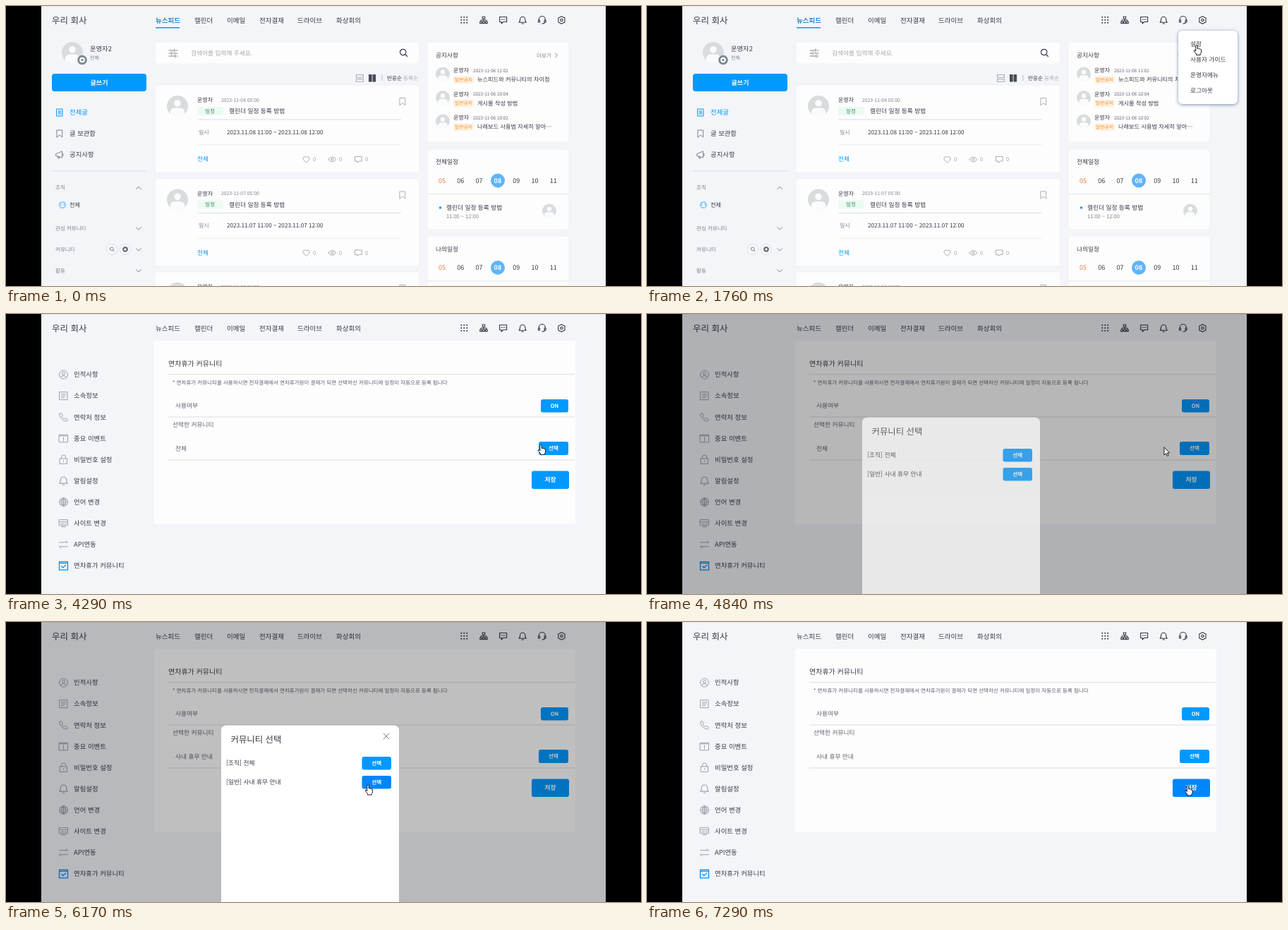
An HTML page for the animation above (7.37 s loop, 900x397 px).

```html
<!DOCTYPE html>
<html lang="ko">
<head>
<meta charset="utf-8">
<title>연차휴가 커뮤니티 설정</title>
<style>
html, body { margin: 0; width: 100%; height: 100%; overflow: hidden; background: #000; }
svg { display: block; width: 900px; height: 397px; }
text { font-family: "Noto Sans CJK KR", "Noto Sans CJK", "Noto Sans", sans-serif; text-rendering: geometricPrecision; white-space: pre; }
#menu { filter: drop-shadow(0 1px 2.5px rgba(60, 85, 130, .65)); }
</style>
</head>
<body>
<svg id="stage" viewBox="0 0 900 397"></svg>
<script>
const INK = '#363b47', GREY = '#7d828d', PALE = '#a9aeb8', LINE = '#e0e3ea',
      BLUE = '#0099ff', HOVER = '#0086fb', BG = '#f4f5f9', WHITE = '#fdfdfe';
const LOOP = 7370;

// Drawing helpers: text is placed by its vertical centre.
const text = (x, y, s, size = 8.7, fill = INK, weight = 400, anchor = 'start') =>
  `<text x="${x}" y="${y + size * .36}" font-size="${size}" fill="${fill}" font-weight="${weight}" text-anchor="${anchor}">${s}</text>`;
const rect = (x, y, w, h, fill, r = 0, extra = '') =>
  `<rect x="${x}" y="${y}" width="${w}" height="${h}" rx="${r}" fill="${fill}" ${extra}/>`;
const circle = (x, y, r, fill, extra = '') => `<circle cx="${x}" cy="${y}" r="${r}" fill="${fill}" ${extra}/>`;
const rule = (x1, x2, y, color = LINE) => rect(x1, y - .6, x2 - x1, 1.2, color);
const card = (x, y, w, h) => rect(x, y, w, h, WHITE, 4, 'stroke="#eceef3" stroke-width=".7"');
const group = (id, body) => `<g id="${id}">${body}</g>`;
const button = (id, x, y, w, h, label, size = 7.6) =>
  rect(x, y, w, h, BLUE, 3, `id="${id}"`) + text(x + w / 2, y + h / 2, label, size, '#fff', 700, 'middle');

const shapes = {
  org: 'M-1.7-5h3.4v3h-3.4zM0-2V1M-4 2V0H4V2M-5.2 2h2.6v2.6h-2.6zM-1.3 2h2.6v2.6h-2.6zM2.6 2h2.6v2.6h-2.6z',
  chat: 'M-5-4.5H5V2.5H0L-2.5 5V2.5H-5zM-2.6-1h.8M-.4-1h.8M1.8-1h.8',
  bell: 'M-5 3.2Q-3.6 2-3.6-1A3.6 3.8 0 0 1 3.6-1Q3.6 2 5 3.2ZM-1.2 5H1.2',
  headset: 'M-4.5 0V-1A4.5 4.5 0 0 1 4.5-1V0M-5.3 0h2v3h-2zM3.3 0h2v3h-2zM4 3Q3.5 5 0 5',
  gear: 'M0-5.3L2-4.2 4.6-3V3L2 4.2 0 5.3-2 4.2-4.6 3V-3L-2-4.2ZM-1.7 0a1.7 1.7 0 1 0 3.4 0a1.7 1.7 0 1 0-3.4 0',
  search: 'M-4.5-1a4.2 4.2 0 1 0 8.4 0a4.2 4.2 0 1 0-8.4 0M2.7 2L5.5 5',
  filter: 'M-6-4H1M4-4H6M2-6V-2M-6 0H-3M0 0H6M-2-2V2M-6 4H2M5 4H6M3 2V6',
  bookmark: 'M-3.7-5H3.7V5L0 2-3.7 5Z',
  heart: 'M0 4.5L-4.2 .4A2.8 2.8 0 0 1 0-3.2A2.8 2.8 0 0 1 4.2 .4Z',
  eye: 'M-5.5 0Q0-7 5.5 0Q0 7-5.5 0ZM-1.6 0a1.6 1.6 0 1 0 3.2 0a1.6 1.6 0 1 0-3.2 0',
  bubble: 'M-4.7-4H4.7V2.5H1L-1.5 4.7V2.5H-4.7Z',
  down: 'M-3.5-1.7L0 1.7 3.5-1.7', up: 'M-3.5 1.7L0-1.7 3.5 1.7', right: 'M-1.5-3L1.5 0-1.5 3',
  page: 'M-4-5H4V5H-4ZM-2-2H2M-2 0H2M-2 2H2',
  horn: 'M-5-1.5L3.5-5V4L-5 1.5ZM-3 2L-2 5H0L-.8 3M5-1.5V1.5',
  person: 'M-6 0a6 6 0 1 0 12 0a6 6 0 1 0-12 0M-2-1.5a2 2 0 1 0 4 0a2 2 0 1 0-4 0M-4 4Q-3.5 1.5 0 1.5T4 4',
  list: 'M-5.5-5.5H5.5V5.5H-5.5ZM-3-2.5H3M-3 0H3M-3 2.5H1',
  phone: 'M-5.5-4.5L-3.5-6-1-2.5-2.5-1Q-1 1.5 1.2 2.6L2.6 1 6 3.5 4.5 5.7Q1 6.5-3 2.3T-5.5-4.5Z',
  event: 'M-6-5H6V5.5H-6ZM-6-3.5H6M0-1.5V2M0 3.2V4',
  lock: 'M-5-1.5H5V6H-5ZM-3-1.5V-3.5A3 3 0 0 1 3-3.5V-1.5M0 1.5V3',
  globe: 'M-6 0a6 6 0 1 0 12 0a6 6 0 1 0-12 0M-6 0H6M0-6V6M-5-3H5M-5 3H5M0-6Q-6 0 0 6Q6 0 0-6',
  site: 'M-6-5H6V3H-6ZM-6-2H6M-3.5 .7H0M2 .7H4M-3 5H3',
  swap: 'M-6-3H6L3.5-5.2M6 3H-6L-3.5 5.2',
  check: 'M-6-5.5H6V6H-6ZM-6-3.5H6M-3 .5L-.7 2.8 3.2-1',
  close: 'M-4-4L4 4M4-4L-4 4'
};
const icon = (name, x, y, color = INK, scale = 1, width = 1) =>
  `<path d="${shapes[name]}" transform="translate(${x} ${y}) scale(${scale})" fill="none" stroke="${color}" stroke-width="${width}" stroke-linejoin="round" stroke-linecap="round"/>`;

const avatar = (x, y, r) => `<g transform="translate(${x} ${y}) scale(${r})">${circle(0, 0, 1, '#d9dcdf')}
  ${circle(0, -.28, .32, '#fafbfc')}<path fill="#fafbfc" d="M-.68 .73V.62Q-.66 .17-.25 .17H.25Q.66 .17 .68 .62V.73A1 1 0 0 1-.68 .73Z"/></g>`;
const cog = (x, y, r, color, hole = '#fff') => circle(x, y, r * .62, 'none', `stroke="${color}" stroke-width="${r * .5}"`) +
  circle(x, y, r * .87, 'none', `stroke="${color}" stroke-width="${r * .28}" stroke-dasharray="${r * .36} ${r * .3233}"`) + circle(x, y, r * .38, hole);

function header() {
  const nav = [[212, '뉴스피드'], [267, '캘린더'], [313, '이메일'], [359, '전자결재'], [413, '드라이브'], [468, '화상회의']];
  let dots = '';
  for (let i = 0; i < 9; i++) dots += circle(645.3 + i % 3 * 4, 15.7 + (i / 3 | 0) * 4, 1.05, INK);
  return text(65, 20, '우리 회사', 12.5) + nav.map(([x, s]) => text(x, 20.5, s, 9.5, INK, 500)).join('') + dots +
    ['org', 'chat', 'bell', 'headset', 'gear'].map((n, i) => icon(n, 677 + i * 27.6, 20, INK, 1, 1.15)).join('');
}

function post(y, day) {
  const stats = [['heart', 425.5, 435], ['eye', 462.5, 472], ['bubble', 499.5, 509]];
  return card(211, y, 375, 124.5) + avatar(243, y + 30, 15) +
    text(271, y + 21.5, '운영자', 8) + text(305, y + 21.5, `2023-11-${day} 05:00`, 6.8, GREY) +
    rect(271, y + 31, 37, 12, '#ecfbf2', 2) + text(289, y + 37, '일정', 7.6, '#3d8d62', 400, 'middle') +
    text(316, y + 37, '캘린더 일정 등록 방법', 8.7, INK, 500) + icon('bookmark', 562, y + 23.5, PALE) +
    rule(271, 560, y + 49) + text(273, y + 67, '일시', 8, GREY) +
    text(313, y + 67, `2023.11.${day} 11:00 ~ 2023.11.${day} 12:00`, 8.2, INK, 500) + rule(271, 560, y + 84.5, '#eceef3') +
    text(271, y + 105, '전체', 8.7, BLUE) +
    stats.map(([n, x, tx]) => icon(n, x, y + 105.5, '#a6abb6') + text(tx, y + 105.5, '0', 7.6, '#a0a5b0', 500)).join('');
}

function week(y, title) {
  const days = ['05', '06', '07', '08', '09', '10', '11'];
  return text(609, y + 18, title, 8.7, INK, 500) + circle(697, y + 44.5, 10, '#5fb4fb') +
    days.map((d, i) => text(618 + i * 26.3, y + 44.5, d, 9, i == 3 ? '#fff' : i ? INK : '#df7c4d', i == 3 ? 700 : 400, 'middle')).join('') +
    rule(597, 798, y + 63.5, '#e4e7ed');
}

function feed() {
  const folds = [[315, '관심 커뮤니티'], [345, '커뮤니티'], [375, '활동']];
  const notices = [['11:02', '뉴스피드와 커뮤니티의 차이점'], ['10:04', '게시물 작성 방법'], ['10:02', '나래보드 사용법 자세히 알아⋯']];
  const left = avatar(94, 66, 15) + circle(108, 76.5, 6.8, '#7c8796') + cog(108, 76.5, 4, '#fff', '#7c8796') +
    text(119, 61, '운영자2', 9.3, INK, 500) + text(119, 73.5, '전체', 7, GREY) +
    rect(65, 96, 134, 25, BLUE, 4) + text(132, 108.5, '글쓰기', 9, '#fff', 700, 'middle') +
    icon('page', 76, 151, BLUE) + text(90, 151, '전체글', 9.4, BLUE, 500) +
    icon('bookmark', 76, 181, GREY) + text(90, 181, '글 보관함', 9.3) +
    icon('horn', 76, 211, GREY) + text(90, 211, '공지사항', 9.4) + rule(65, 199, 234, '#d9dde4') +
    text(70, 257, '조직', 7.6, GREY) + icon('up', 188, 258, GREY) +
    circle(80, 282, 5.3, '#9fcdf6') + circle(80, 280.5, 1.6, '#fff') + rect(77.3, 282.5, 5.4, 2.5, '#fff', 1) + text(90, 282, '전체', 8.2) +
    folds.map(([y, s]) => text(70, y, s, 7.5, GREY) + icon('down', 188, y + .5, GREY)).join('') +
    [150, 169].map(x => circle(x, 345, 7.5, '#f8f9fb', 'stroke="#d4d8e0" stroke-width=".8"')).join('') +
    icon('search', 150, 345, INK, .6) + cog(169, 345, 4, '#626875');
  const middle = card(211, 51, 375, 31) + icon('filter', 237, 67, GREY) + text(262, 66.5, '검색어를 입력해 주세요.', 8.7, '#a3a7b0') +
    icon('search', 563, 66.5, INK, 1, 1.2) +
    [97.5, 103.5].map(y => rect(496.5, y, 10, 3.7, 'none', 0, 'stroke="#a4a9b3"')).join('') +
    rect(514, 97, 4.6, 10.5, '#454b58') + rect(519.5, 97, 4.6, 10.5, '#454b58') + rect(532.5, 98, .8, 8, PALE) +
    text(540, 102, '반응순', 7.6, INK, 500) + text(563, 102, '등록순', 7.6, PALE) +
    post(112, '08') + post(244.5, '07') + card(211, 377, 375, 125) + avatar(243, 407, 15) +
    text(271, 398.5, '운영자', 8) + text(305, 398.5, '2023-11-06 11:25', 6.8, GREY) + icon('bookmark', 562, 400.5, PALE);
  const right = card(597, 51, 201, 142) + text(609, 70, '공지사항', 8.7, INK, 500) + text(752, 70, '더보기', 7.6, GREY) + icon('right', 780, 70, GREY) +
    notices.map(([time, s], i) => {
      const y = 91.5 + i * 33.5;
      return avatar(619, y + 5, 10) + text(634, y, '운영자', 8) + text(662, y, `2023-11-06 ${time}`, 6.3, '#5f6470') +
        rect(634, y + 7.5, 29, 11, '#fff3e4', 2) + text(648.5, y + 13, '일반공지', 6.9, '#f58a22', 500, 'middle') + text(668, y + 13, s, 8.2, INK, 500);
    }).join('') +
    card(597, 203, 201, 114) + week(203, '전체일정') + circle(615.5, 286, 1.8, '#2c8df0') + text(624, 286, '캘린더 일정 등록 방법') +
    text(624, 298, '11:00 ~ 12:00', 7.5, GREY) + avatar(770, 290.5, 10) +
    card(597, 326, 201, 114) + week(326.5, '나의일정');
  return left + middle + right + text(212, 20.5, '뉴스피드', 9.5, BLUE, 500) + rect(212, 30, 34, 1.5, BLUE);
}

function sidebar(active) {
  const items = [['person', '인적사항'], ['list', '소속정보'], ['phone', '연락처 정보'], ['event', '중요 이벤트'], ['lock', '비밀번호 설정'],
    ['bell', '알림설정'], ['globe', '언어 변경'], ['site', '사이트 변경'], ['swap', 'API연동'], ['check', '연차휴가 커뮤니티']];
  return items.map(([n, s], i) => {
    const y = 86 + i * 30.1, on = i == active;
    return icon(n, 81.5, y, on ? '#0b8cf0' : '#9ba1ad', n == 'bell' ? 1.15 : 1, on ? 1.3 : 1) + text(96, y, s, 9.4);
  }).join('');
}

function profile() {
  const select = (x, w, s) => rect(x, 340, w, 19, WHITE, 2, 'stroke="#dfe3ea"') + text(x + 6.5, 349.5, s, 7.6, GREY) +
    `<path d="M${x + w - 13} 347.5h7l-3.5 5z" fill="#8fa5bf"/>`;
  return rect(210, 38, 597, 359, WHITE) + sidebar(0) + text(230, 70, '인적사항', 10, INK, 500) +
    [85.5, 243, 283, 324, 375].map(y => rule(230, 590, y)).join('') +
    avatar(410, 164, 53.5) + circle(448, 202, 11, WHITE) + cog(448, 202, 8.5, '#bcc2c8', WHITE) +
    rect(474.5, 196, 64, 18.5, '#ecedf4', 3, 'stroke="#e0e2ec" stroke-width=".8"') + text(506.5, 205, '기본 프로필', 7.6, INK, 500, 'middle') +
    text(240, 263, '이름', 8.7, '#5d626d') + text(336, 263, '운영자2') + text(240, 303, '성별', 8.7, '#5d626d') + text(336, 303, '여') +
    text(240, 349, '생일', 8.7, '#5d626d') + select(336, 47, '2023') + select(392, 35, '11') + select(435, 35, '8') +
    rect(336, 390.5, 203.5, 20, '#fff', 2, 'stroke="#5eb5f2"') +
    group('underline', rect(96, 362, 72, .9, INK));
}

function community() {
  return rect(210, 38, 597, 260, WHITE) + sidebar(9) + text(230, 70, '연차휴가 커뮤니티', 10, INK, 500) +
    [85.5, 146, 207].map(y => rule(230, 806, y)).join('') +
    text(236, 97, '* 연차휴가 커뮤니티를 사용하시면 전자결재에서 연차휴가원이 결재가 되면 선택하신 커뮤니티에 일정이 자동으로 등록 됩니다', 7.5, '#5d626d') +
    text(240, 130, '사용여부', 8.7, '#5d626d') + text(236, 157, '선택한 커뮤니티', 8.7, '#5d626d') +
    group('before', text(240, 190.5, '전체', 8.7, '#5d626d')) + group('after', text(240, 190.5, '사내 휴무 안내', 8.7, '#5d626d')) +
    button('on', 758, 121, 39, 18.5, 'ON') + button('choose', 755, 181, 42, 19, '선택') + button('save', 745, 222.5, 53, 25.5, '저장', 8.8);
}

const menu = () => rect(753, 35, 84, 104, '#fff', 6) +
  ['설정', '사용자 가이드', '운영자메뉴', '로그아웃'].map((s, i) => text(770, 54 + i * 22, s)).join('');

const modal = () => rect(305, 146.5, 252, 270, '#fff', 7) + text(318.5, 167, '커뮤니티 선택', 12.4, INK, 500) +
  text(312, 199.5, '[조직] 전체', 8.75) + text(312, 226.5, '[일반] 사내 휴무 안내', 8.75) +
  button('pickAll', 504.5, 191, 41.5, 18.5, '선택') + button('pickLeave', 504.5, 218, 41.5, 18.5, '선택') +
  group('close', icon('close', 539, 162, '#70798a'));

const pointer = (id, d) => `<path id="${id}" d="${d}" fill="#fff" stroke="#171a20" stroke-width="1" stroke-linejoin="round"/>`;

document.getElementById('stage').innerHTML =
  rect(50, 0, 800, 397, BG) + rect(50, 0, 800, .8, '#e2e4e9') +
  group('profile', profile()) + group('community', community()) + header() + group('feed', feed()) + group('menu', menu()) +
  rect(50, 0, 800, 397, '#000', 0, 'id="shade"') + group('modal', modal()) +
  group('cursor', pointer('arrow', 'M0 0V11L2.6 8.7 4.3 12.6 6.1 11.8 4.4 8H7.6Z') +
    pointer('hand', 'M-1.2 1.2Q0-.6 1.2 1.2V5.5Q2.3 4.6 3.2 5.8Q4.3 5.2 5 6.4Q6.4 6 6.6 7.5V10Q6.6 12 5.2 13V14.5H-.5V13Q-2 11-4 8.5Q-3.8 6.8-2 8L-1.2 9Z'));

const el = id => document.getElementById(id);
const show = (id, on) => { el(id).style.display = on ? '' : 'none'; };
const paint = (id, hot) => el(id).setAttribute('fill', hot ? HOVER : BLUE);
const within = (t, a, b) => t >= a && t < b;

// Linear interpolation through rows of [time, value, ...].
function track(rows, t) {
  if (t <= rows[0][0]) return rows[0].slice(1);
  const i = rows.findIndex(r => r[0] > t);
  if (i < 0) return rows.at(-1).slice(1);
  const a = rows[i - 1], b = rows[i], k = (t - a[0]) / (b[0] - a[0]);
  return a.slice(1).map((v, j) => v + (b[j + 1] - v) * k);
}

const PATH = [[200, 826, 309], [410, 750, 50], [550, 750, 50], [1000, 785, 14], [1350, 785, 12], [1760, 779, 55], [1960, 779, 55],
  [2640, 115, 331], [2700, 112, 347], [2780, 112, 350], [2900, 112, 350], [3070, 104, 358], [3210, 104, 358], [3920, 672, 202],
  [4290, 758, 185], [4690, 772, 185], [4770, 772, 185], [4990, 651, 197], [5480, 520, 227], [5680, 513, 230.5],
  [6500, 513, 230.5], [7080, 765, 233], [7220, 765, 233], [7290, 766.5, 231.5]];
const HANDS = [[900, 1990], [2560, 3280], [4230, 4800], [5520, 6260], [7010, LOOP]];
const SHADE = [[4700, 0], [4770, .15], [4910, .4], [6000, .4], [6170, .25], [6300, 0]];
const MODAL = [[4700, 0], [4770, .4], [4910, 1], [6180, 1], [6300, 0]];
const MENU = [[1180, 0, -18], [1400, 1, 0]];

function draw(t) {
  show('feed', t < 1960);
  show('profile', within(t, 1960, 3210));
  show('community', t >= 3210);
  show('underline', t >= 2690);
  show('before', t < 6030);
  show('after', t >= 6030);
  show('close', t >= 5060);

  const [fade, drop] = track(MENU, t);
  show('menu', within(t, 1180, 1960));
  el('menu').setAttribute('opacity', fade);
  el('menu').setAttribute('transform', `translate(0 ${drop})`);
  el('shade').setAttribute('opacity', track(SHADE, t)[0]);
  el('modal').setAttribute('opacity', track(MODAL, t)[0]);

  paint('choose', within(t, 4350, 4770));
  paint('pickLeave', t >= 5550);
  paint('save', t >= 7010);

  const [x, y] = track(PATH, t), hand = HANDS.some(([a, b]) => within(t, a, b));
  show('cursor', t >= 200);
  show('hand', hand);
  show('arrow', !hand);
  el('cursor').setAttribute('transform', `translate(${x} ${y})`);
}

const start = performance.now();
function tick() {
  draw((performance.now() - start) % LOOP);
  requestAnimationFrame(tick);
}
tick();
</script>
</body>
</html>
```
